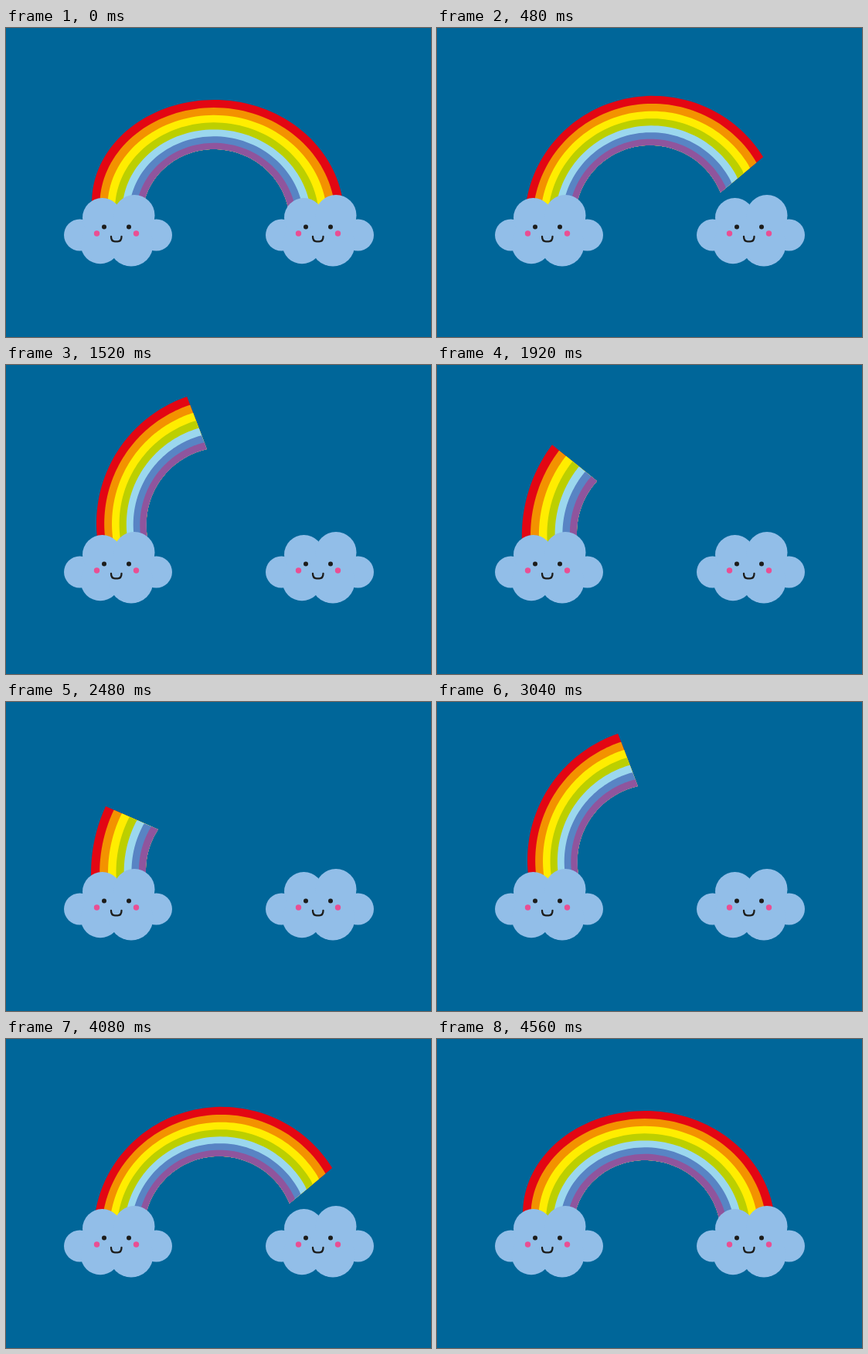
Write an HTML page with a canvas that moves like this. It is 550 px wide and 400 px high and loops after 4760 ms.

```html
<!DOCTYPE html>
<html lang="en">
<head>
<meta charset="utf-8">
<title>Rainbow between clouds</title>
<style>
  html, body { margin: 0; width: 100%; height: 100%; overflow: hidden; background: #069; }
  canvas { display: block; }
</style>
</head>
<body>
<canvas id="stage" width="550" height="400"></canvas>
<script>
const ctx = document.getElementById('stage').getContext('2d');
const STEP = 80, LOOP = 4760, LAST = 57;
const COLORS = ['#e30613', '#f39200', '#ffed00', '#bccf00', '#9bd7ee', '#5884c4', '#8f559d'];

// An arch is [apex x, apex y, left width, left height, right width, right height, sweep],
// with the sweep in degrees clockwise from the left.
const round = (x, y, r, sweep) => [x, y - r, r, r, r, r, sweep];
const POSES = [
  { at: 0,  outer: [269.5, 93, 158.5, 133, 168, 152, 180], inner: [269, 157, 92.5, 88, 98, 95, 180] },
  { at: 7,  outer: round(281, 254, 167, 143.5),            inner: round(277, 249, 98, 154.5) },
  { at: 12, outer: round(288, 241, 168, 118.3),            inner: round(284, 246, 100, 122.4) },
  { at: 19, outer: round(290.4, 205, 173.4, 71.1),         inner: round(282, 207, 100.4, 77.3) },
  { at: 21, outer: round(290.5, 220, 181, 54.8),           inner: round(286, 217, 105, 55.9) },
  { at: 26, outer: round(318, 222, 208, 24.7),             inner: round(277, 218, 96, 33.5) },
  { at: 28, outer: round(318, 222, 209, 12.4),             inner: round(277, 218, 96, 17) }
];

const mix = (a, b, p) => a.map((v, i) => v + (b[i] - v) * p);

function pointOn([x, top, lw, lh, rw, rh], deg) {
  const a = deg * Math.PI / 180;
  const [w, h] = deg < 90 ? [lw, lh] : [rw, rh];
  return [x - w * Math.cos(a), top + h - h * Math.sin(a)];
}

function angleOf([x, top, lw, lh, rw, rh], [px, py]) {
  const [w, h] = px < x ? [lw, lh] : [rw, rh];
  const deg = Math.atan2((top + h - py) / h, (x - px) / w) * 180 / Math.PI;
  return deg < -90 ? deg + 360 : deg;
}

function drawRainbow(step) {
  const i = Math.max(1, POSES.findIndex(pose => pose.at >= step));
  const from = POSES[i - 1], to = POSES[i];
  const p = (step - from.at) / (to.at - from.at);
  const outer = mix(from.outer, to.outer, p);
  const inner = mix(from.inner, to.inner, p);
  const outerTip = pointOn(outer, outer[6]);
  const innerTip = pointOn(inner, inner[6]);

  // Tips of all band edges lie on one straight cut.
  const edge = part => {
    const arch = mix(outer, inner, part);
    const tip = mix(outerTip, innerTip, part);
    const start = -10, end = angleOf(arch, tip), count = 80;
    const points = Array.from({ length: count }, (_, n) =>
      pointOn(arch, start + (end - start) * n / count));
    return [...points, tip];
  };

  const last = edge(1).reverse();
  COLORS.forEach((color, n) => {
    const part = n / COLORS.length;
    ctx.fillStyle = color;
    ctx.beginPath();
    // Bands get slightly narrower towards the inside.
    for (const point of [...edge(part * (1.12 - 0.12 * part)), ...last]) ctx.lineTo(...point);
    ctx.fill();
  });
}

function dot(x, y, r, color) {
  ctx.fillStyle = color;
  ctx.beginPath();
  ctx.arc(x, y, r, 0, 2 * Math.PI);
  ctx.fill();
}

function drawCloud(x) {
  const body = '#92bee8', ink = '#1d1d1b', blush = '#e94f93';
  ctx.save();
  ctx.translate(x, 0);
  dot(20.5, 268, 20.5, body);
  dot(119.5, 268, 20.5, body);
  dot(49.5, 245.5, 25.5, body);
  dot(91, 242.5, 26.5, body);
  dot(47, 280, 25.3, body);
  dot(87, 280, 28.5, body);
  ctx.fillRect(28, 250, 85, 34);

  for (const eye of [52, 84]) dot(eye, 257.5, 3, ink);
  for (const cheek of [42.5, 93.5]) dot(cheek, 266, 3.7, blush);
  ctx.strokeStyle = ink;
  ctx.lineWidth = 2.3;
  ctx.lineCap = 'round';
  ctx.beginPath();
  ctx.moveTo(61, 270);
  ctx.bezierCurveTo(61, 274.5, 63, 276.3, 66, 276.3);
  ctx.lineTo(69.5, 276.3);
  ctx.bezierCurveTo(72.5, 276.3, 74.5, 274.5, 74.5, 270);
  ctx.stroke();
  ctx.restore();
}

function draw(now) {
  const tick = Math.min(LAST, Math.floor(now % LOOP / STEP));
  ctx.fillStyle = '#069';
  ctx.fillRect(0, 0, 550, 400);
  drawRainbow(Math.min(tick, LAST - tick));
  drawCloud(75);
  drawCloud(336);
}

const begin = performance.now();
function run() {
  draw(performance.now() - begin);
  requestAnimationFrame(run);
}
run();
</script>
</body>
</html>
```
